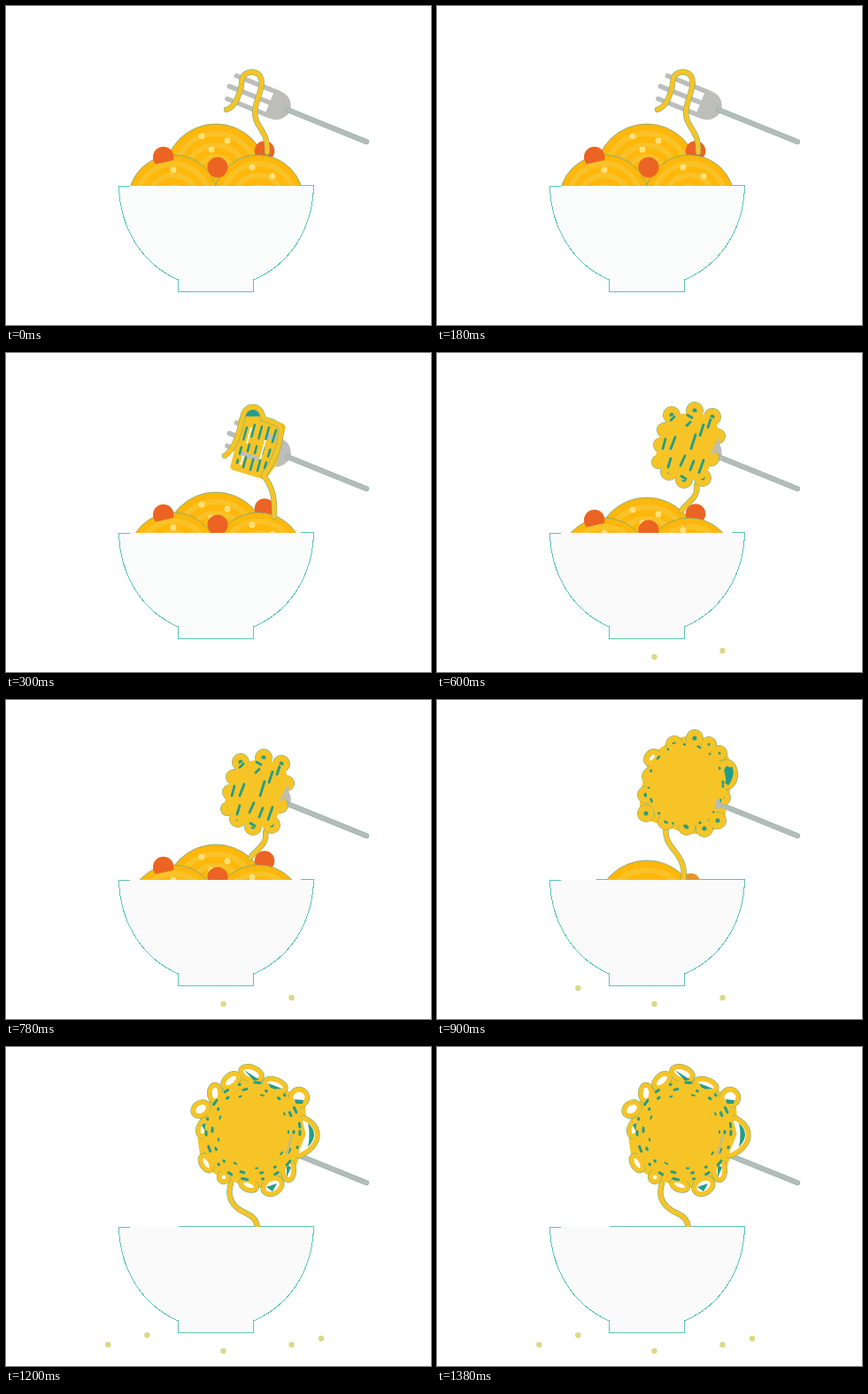
These frames come from a looping animation (480x360 px, 1500 ms). An HTML page without scripts:

```html
<!DOCTYPE html>
<html lang="en">
<head>
<meta charset="utf-8">
<title>Spaghetti</title>
<style>
html,body{margin:0;width:100%;height:100%;overflow:hidden;background:#fff}
svg{display:block;width:100vw;height:100vh}
.step,.pile,.mid,.crumb,.bowl,.dot{animation:show 1.5s step-end infinite}
.s1{animation-delay:-1.2s}
.s2{animation-delay:-.9s}
.s3{animation-delay:-.6s}
.s4{animation-delay:-.3s}
.pile{animation-name:front}
.mid{animation-name:back}
.bowl{animation-name:bowl}
.dot{animation-name:until3;fill:#ffe07a}
.crumb{animation-name:from4;fill:#dcd888}
.c2{animation-name:from2}
.c3{animation-name:from3}
@keyframes show{0%{visibility:visible}20%,100%{visibility:hidden}}
@keyframes front{0%{transform:none}20%{transform:translateY(12px)}40%{transform:translateY(18px)}60%,100%{transform:translateY(70px)}}
@keyframes back{0%{transform:none}20%{transform:translateY(24px)}40%{transform:translateY(30px)}60%{transform:translateY(48px)}80%,100%{transform:translateY(90px)}}
@keyframes bowl{0%{fill:#fafcfc}40%,100%{fill:#fafafa}}
@keyframes until3{0%{visibility:visible}60%,100%{visibility:hidden}}
@keyframes from2{0%{visibility:hidden}40%,100%{visibility:visible}}
@keyframes from3{0%{visibility:hidden}60%,100%{visibility:visible}}
@keyframes from4{0%{visibility:hidden}80%,100%{visibility:visible}}
.strand{fill:none;stroke-linecap:round;stroke-linejoin:round}
.strand use:first-child{stroke:#6aa68b;stroke-width:calc(var(--w,5.3px) + 1px)}
.strand use:last-child{stroke:#f6c426;stroke-width:var(--w,5.3px)}
.thick{--w:7px}
.body{fill:#f6c426;stroke:#f6c426;stroke-width:9;stroke-linejoin:round}
.gap{fill:none;stroke:#239d8b}
.teal{fill:#239d8b}
.white{fill:#fff}
.tomato{fill:#ec6423}
.rim{stroke:#65a58c;stroke-width:.7}
.line{fill:none;stroke:#5cc4b8;shape-rendering:crispEdges}
</style>
</head>
<body>
<svg viewBox="0 0 480 360">
<defs>
  <clipPath id="above"><path d="M0 0H480V203H0Z"/></clipPath>
  <g id="mound">
    <circle r="51" fill="#ffb70b" class="rim"/>
    <g fill="none" stroke="#f9c228" stroke-width="6">
      <circle r="41"/><circle r="28"/><circle r="15"/>
    </g>
  </g>
  <path id="n0" d="M249 117C258 114 261 106 265 94C267 87 264 75 278 74.500C290 75 290 87 287 96C284 108 278 118 283 130C288 141 296 146 295 165"/>
  <path id="n1" d="M247 116C258 109 263 91 267 75C268 56 290 57 290 74C300 77 309 80 311 85C310 103 305 120 291 138C300 151 304 159 303 185"/>
  <path id="n2" d="M293 149C296 163 283 168 276 178"/>
  <path id="n3" d="M259 143C255 163 272 169 277 185Q280 193 278 206"/>
  <path id="n4" d="M254 154C248 173 260 183 272 188Q284 193 284 206"/>
  <g id="loops2">
    <circle cx="265" cy="70" r="6"/><circle cx="291" cy="65" r="6"/><circle cx="311" cy="72" r="6"/>
    <circle cx="317" cy="94" r="5"/><circle cx="310" cy="119" r="5"/><circle cx="300" cy="141" r="6"/>
    <circle cx="279" cy="143" r="6"/><circle cx="262" cy="134" r="6"/><circle cx="250" cy="123" r="4"/>
    <circle cx="253" cy="104" r="5"/><circle cx="257" cy="87" r="5"/>
  </g>
  <g id="loops3">
    <circle cx="291" cy="43" r="6"/><circle cx="268" cy="50" r="6"/><ellipse cx="243" cy="65" rx="5" ry="7" transform="rotate(40 243 65)"/>
    <circle cx="241" cy="86" r="6"/><circle cx="236" cy="107" r="6"/><circle cx="236" cy="128" r="6"/>
    <circle cx="259" cy="137" r="6"/><circle cx="282" cy="143" r="6"/><circle cx="302" cy="145" r="6"/>
    <circle cx="317" cy="136" r="6"/><circle cx="322" cy="110" r="6"/><ellipse cx="328" cy="84" rx="8" ry="13"/>
    <circle cx="319" cy="60" r="5"/><circle cx="307" cy="50" r="5"/>
  </g>
  <g id="loops4">
    <ellipse cx="277" cy="30" rx="12" ry="7" transform="rotate(20 277 30)"/>
    <ellipse cx="254" cy="38" rx="10" ry="6" transform="rotate(-40 254 38)"/>
    <ellipse cx="236" cy="52" rx="6" ry="9"/>
    <ellipse cx="220" cy="70" rx="9" ry="7" transform="rotate(-35 220 70)"/>
    <ellipse cx="224" cy="91" rx="6" ry="10" transform="rotate(25 224 91)"/>
    <ellipse cx="226" cy="131" rx="5" ry="9" transform="rotate(-30 226 131)"/>
    <circle cx="246" cy="147" r="5"/>
    <ellipse cx="274" cy="156" rx="9" ry="5" transform="rotate(20 274 156)"/>
    <ellipse cx="301" cy="157" rx="11" ry="8" transform="rotate(-30 301 157)"/>
    <ellipse cx="319" cy="139" rx="6" ry="11"/>
    <ellipse cx="331" cy="57" rx="9" ry="9"/>
    <ellipse cx="304" cy="43" rx="12" ry="6" transform="rotate(20 304 43)"/>
    <path d="M336 80C358 89 357 113 330 123"/>
  </g>
</defs>

<g clip-path="url(#above)">
  <g class="mid">
    <circle cx="237" cy="191" r="58" fill="#ffb70b" class="rim"/>
    <g fill="none" stroke="#f9c228" stroke-width="6">
      <circle cx="237" cy="191" r="47"/><circle cx="237" cy="191" r="34"/><circle cx="237" cy="191" r="21"/>
    </g>
    <g class="dot"><circle cx="221" cy="147" r="3.500"/><circle cx="250" cy="152" r="3.500"/><circle cx="232" cy="162" r="3.500"/></g>
  </g>
  <g class="pile">
    <circle class="tomato" cx="292" cy="163.500" r="11.300"/>
    <use href="#mound" x="189" y="219"/>
    <use href="#mound" x="285" y="219"/>
    <path class="tomato" d="M169 178.500A11.800 11.800 0 1 1 189 174Z"/>
    <circle class="tomato" cx="239" cy="182" r="11.500"/>
    <g class="dot"><circle cx="189" cy="185" r="3.500"/><circle cx="278" cy="182" r="3.500"/><circle cx="301" cy="192" r="3.500"/></g>
  </g>
  <circle class="step s3" cx="286.500" cy="206.500" r="11" fill="#e8942b"/>
</g>

<path class="bowl" d="M127.500 203H347.500C346 253 320 292 280 309V322H195V309C155 292 129 253 127.500 203Z"/>
<path class="line" d="M140 203.500H127.500C129 253 155 292 194.500 309V322.500H279.500V309C320 292 346 253 347.500 203.500V202.500H333"/>
<path class="line step s4" d="M195 202.500H347"/>
<path class="line step s3" d="M180 202.500H192M297 202.500H347"/>

<g transform="translate(320 118) rotate(22)" fill="none" stroke="#bdbebc" stroke-width="5.500" stroke-linecap="round">
  <path d="M-70 -14H-20M-73 0H-20M-70 14H-20"/>
  <path d="M-24 -16.500H-16C-5 -16 0 -8 1 0C0 8 -5 16 -16 16.500H-24Z" fill="#bdbebc" stroke="none"/>
  <path d="M-2 0H94" stroke="#7cb5a9" stroke-width="6"/>
  <path d="M-2 0H94" stroke="#b7bbb8" stroke-width="4.800"/>
</g>

<g class="step strand"><use href="#n0"/><use href="#n0"/></g>

<g class="step s1">
  <path class="teal" d="M269 75Q270 63 279 63Q288 64 289 75Z"/>
  <path class="body" stroke-width="4" d="M267 76L290 76L311 84L302 123L291 138L258 128L263 108Z"/>
  <path d="M265 113L285 120M293 93L306 97" stroke="#bdbebc" stroke-width="5"/>
  <path class="gap" stroke-width="2.600" stroke-linecap="round" stroke-dasharray="14 9 8 7" d="M272 84L261 124M281 81L268 129M289 83L276 132M297 84L284 133M305 87L292 130"/>
  <path d="M277 84L272 102M293 98L287 120M268 116L265 126" stroke="#fff" stroke-width="1.800"/>
  <g class="strand"><use href="#n1"/><use href="#n1"/></g>
</g>

<g class="step s2">
  <g class="strand"><use href="#n2"/><use href="#n2"/></g>
  <g class="strand thick" style="fill:#239d8b"><use href="#loops2"/><use href="#loops2"/></g>
  <path class="body" d="M267 75L291 71L311 78L315 95L307 120L298 138L279 139L262 131L251 118L258 88Z"/>
  <path class="gap" stroke-width="2.800" stroke-linecap="round" d="M264 76L268 72M283 70L288 73M309 75L306 84M286 78L282 82M258 97L255 108M269 95L264 108M280 116L275 127M292 92L287 108M301 81L297 93M290 122L286 132M301 121L296 135M264 119L261 129M276 139L281 142"/>
  <path d="M319 97L310 114" stroke="#bdbeb2" stroke-width="3"/>
</g>

<g class="step s3" clip-path="url(#above)">
  <g class="strand"><use href="#n3"/><use href="#n3"/></g>
  <path class="body" d="M290 43L267 49L244 66L234 105L233 129L259 138L282 146L302 147L320 138L324 110L332 84L322 59Z"/>
  <g class="strand thick" style="fill:#239d8b"><use href="#loops3"/><use href="#loops3"/></g>
  <ellipse class="white" cx="243" cy="65" rx="2" ry="4" transform="rotate(40 243 65)"/>
  <ellipse class="body" cx="281" cy="95" rx="41" ry="43"/>
  <ellipse class="gap" cx="281" cy="96" rx="42" ry="46" stroke-width="2.500" stroke-dasharray="3 13 5 11 2 17"/>
  <path d="M331 76Q335 84 327 95" class="gap" stroke-width="5"/>
  <path d="M316 117L345 128.600" stroke="#b0bcb5" stroke-width="5"/>
  <path d="M317 112V123" stroke="#bdbeb2" stroke-width="5"/>
</g>

<g class="step s4" clip-path="url(#above)">
  <g class="strand"><use href="#n4"/><use href="#n4"/></g>
  <path class="body" d="M277 37L255 43L238 56L224 76L221 104L225 131L246 144L274 153L301 156L320 142L327 123L336 98L333 62L304 47Z"/>
  <path class="teal" d="M340 80C354 91 352 110 335 120Q342 99 340 80Z"/>
  <g class="strand" style="fill:#fff"><use href="#loops4"/><use href="#loops4"/></g>
  <path class="teal" d="M341 86Q355 98 341 113Q344 99 341 86ZM326 59L336 60L335 64L327 64ZM294 158L306 154L301 163ZM317 132L322 136L317 147ZM269 26L286 37L280 38ZM296 41L312 47L300 48ZM221 88L226 85L225 96Z"/>
  <path class="body" d="M278 43L257 47L242 60L231 80L227 106L233 127L250 139L275 147L297 147L312 135L325 120L334 98L326 68L304 52Z"/>
  <g class="gap" stroke-width="3" stroke-linecap="round">
    <ellipse cx="279" cy="95" rx="53" ry="55" stroke-dasharray="4 14 1 17 6 13"/>
    <ellipse cx="279" cy="95" rx="46" ry="48" stroke-dasharray="2 19 4 22 1 15"/>
    <ellipse cx="279" cy="95" rx="40" ry="42" stroke-width="2" stroke-dasharray="2 23 3 31"/>
  </g>
  <path d="M323 99L317 121" stroke="#c9bd7a" stroke-width="3"/>
</g>

<circle class="crumb c2" cx="245.500" cy="343" r="3.200"/>
<circle class="crumb c2" cx="322.500" cy="336" r="3.200"/>
<circle class="crumb c3" cx="159.300" cy="325.300" r="3.200"/>
<circle class="crumb" cx="115.300" cy="336" r="3.200"/>
<circle class="crumb" cx="356" cy="329" r="3.200"/>
</svg>
</body>
</html>
```
